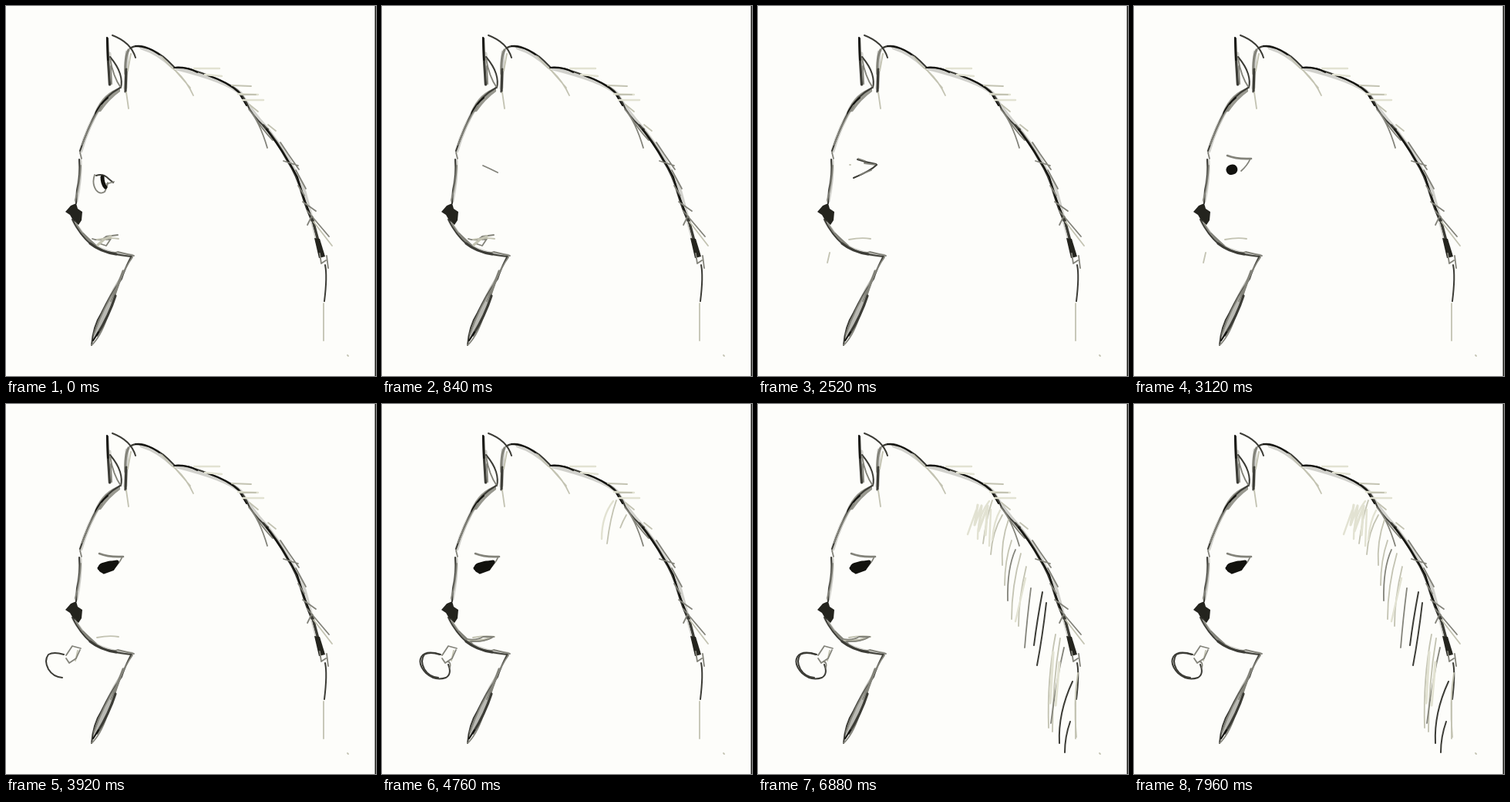
Animation of 480 by 480 pixels, one loop 8000 ms. Source, as an HTML page:

```html
<!DOCTYPE html>
<html lang="en">
<head>
<meta charset="utf-8">
<title>Pencil sketch</title>
<style>
  html, body { margin: 0; width: 100%; height: 100%; overflow: hidden; background: #fdfdfa; }
  svg { display: block; width: 100vw; height: 100vh; }
  #sketch { filter: blur(.55px); }
  path { fill: none; stroke-linecap: round; stroke-linejoin: round; }
  .ink { stroke: #12120e; stroke-width: 2; }
  .dark { stroke: #3c3c36; stroke-width: 2; }
  .mid { stroke: #83837a; stroke-width: 1.8; }
  .pale { stroke: #c3c3b2; stroke-width: 1.8; }
  .wash { stroke: #e2e2d2; stroke-width: 2.4; }
  .bold { stroke-width: 3.2; }
  .soft { stroke: #77776c; stroke-width: 5; opacity: .32; }
  .fill { fill: #24241e; stroke: none; }
  .shade { fill: #77776c; stroke: none; opacity: .75; }
  [data-t] { visibility: hidden; stroke-dasharray: 1 2; }
</style>
</head>
<body>
<svg viewBox="0 0 480 480">
  <path d="M479.250 0V480" stroke="#20201c" stroke-width="1.5"/>
  <g id="sketch">

  <g id="ears">
    <path class="soft" d="M134 62L135 101M157 60L155 106"/>
    <path class="dark bold" d="M131.500 42Q132 72 134.500 102"/>
    <path class="ink" d="M131 41L132 70"/>
    <path class="dark" d="M138 38Q162 47 168 67"/>
    <path class="dark" d="M135 66Q145 78 148 88T149 106"/>
    <path class="mid" d="M135 68Q139 92 149 106M136 78L137 101"/>
    <path class="mid bold" d="M159 57Q154 66 155 88"/>
    <path class="dark bold" d="M156 82L155 111"/>
    <path class="pale" d="M156 112L159 133M162 62L158 84"/>
    <path class="soft" d="M176 54Q198 61 216 79"/>
    <path class="dark" d="M161 55Q168 50 180 53Q199 60 210 71L219 80"/>
    <path class="ink" d="M168 52Q184 52 199 63"/>
    <path class="pale" d="M202 66Q211 77 220 84Q235 98 243 116M218 82L239 106"/>
  </g>

  <g id="back">
    <path class="soft" d="M222 81Q286 97 304 113Q316 134 340 161Q370 199 387 241L407 315"/>
    <path class="dark" d="M218 80Q230 78 245 84Q286 97 301 110Q310 119 316 134Q327 151 340 160"/>
    <path class="ink" d="M219 80Q236 79 248 86M262 90Q288 99 302 112L312 129"/>
    <path class="mid" d="M315 134Q329 150 339 184M320 140Q333 161 346 174"/>
    <path class="dark bold" d="M334 155Q352 176 365 200Q378 220 384 243Q390 263 397 278"/>
    <path class="ink" d="M338 160Q361 190 378 222Q384 246 397 276L410 324"/>
    <path class="dark bold" d="M397 274L406 308"/>
    <path class="fill" d="M400 301L407 302L414 325L406 327Z"/>
    <path class="mid" d="M407 321L409 334L415 330M416 324L418 340"/>
    <path class="dark" d="M414 336Q417 350 413 383"/>
    <path class="pale" d="M412 386V434"/>
    <path class="wash" d="M244 81H277M258 89L280 91M307 122H334M301 114L327 115"/>
    <path class="pale" d="M293 103L318 104M304 115L324 115M316 128L327 137M340 154L350 162"/>
    <path class="mid" d="M356 177L366 192L380 212M360 201L379 207M376 213L389 237M379 233L387 246M385 254L402 266M391 266L419 299M396 274L391 284"/>
    <path class="pale" d="M399 280L423 311"/>
  </g>

  <g id="profile">
    <path class="shade" d="M148 106Q126 112 115 138L123 137Q134 121 148 111Z"/>
    <path class="soft" d="M123 129Q106 156 97 188M96 201Q97 224 91 253"/>
    <path class="dark" d="M148 106Q128 117 118 136Q106 159 96 188"/>
    <path class="ink" d="M132 119Q121 128 116 140"/>
    <path class="mid" d="M124 129Q109 151 99 180M96 190L98 198"/>
    <path class="dark" d="M95 199Q97 219 92 239L91 256"/>
    <path class="mid" d="M97 207Q96 230 90 252"/>
    <path class="fill" d="M77 267L84 259L91 256L93 263L99 267L98 278L94 284L87 278L83 271Z"/>
    <path class="soft" d="M89 281Q106 309 124 316Q142 323 163 324"/>
    <path class="dark" d="M86 277Q96 297 110 309Q125 321 163 325"/>
    <path class="mid" d="M91 283Q103 303 119 313T145 319L166 324M100 295L117 311"/>
    <path class="dark bold" d="M109 308Q123 319 143 322"/>
  </g>

  <g id="neck">
    <path class="shade" d="M152 346Q139 363 125 395Q113 414 112 437L121 424Q134 404 140 381Z" style="opacity:.5"/>
    <path class="dark" d="M162 326Q154 341 150 354Q135 375 124 398Q113 415 111 440"/>
    <path class="mid" d="M164 326Q155 338 147 359Q139 383 131 405Q122 430 111 440M144 364Q126 391 114 426M155 340L136 383"/>
    <path class="dark bold" d="M142 376Q134 401 118 427"/>
    <path class="mid bold" d="M152 344L144 365"/>
    <path class="ink" d="M120 423L113 434"/>
  </g>
  <path class="pale" d="M443 453L444 454"/>

  <!-- data-t: draw start, draw end, erase start, erase end -->
  <g id="eyes">
    <path class="mid" data-t="-2 -1 0 240" d="M115 219Q111 230 117 239Q122 245 128 241Q132 233 132 229"/>
    <path class="dark" data-t="-2 -1 160 400" d="M117 220Q126 217 133 224L139 229"/>
    <path class="ink" data-t="-2 -1 280 560" stroke-linecap="butt" style="stroke-width:5" d="M125 222Q125 230 129 235"/>
    <path class="mid" data-t="-2 -1 360 600" d="M130 231L140 228"/>
    <path class="mid" data-t="680 840 1000 1240" d="M131 207Q140 211 150 216"/>
    <path class="dark" data-t="1320 1600 2600 2760" d="M129 199Q140 203 153 205"/>
    <path class="mid" data-t="1600 1760 2600 2760" d="M130 198L139 201M138 204L154 206"/>
    <path class="dark" data-t="1760 2120 2640 2840" d="M154 206Q146 214 124 223"/>
    <path class="mid" data-t="2120 2280 2640 2840" d="M147 213L132 219"/>
    <path class="pale" data-t="2280 2320 2700 2760" d="M119 206L120 206"/>
    <path class="mid" data-t="2840 3040" style="stroke-width:2.600" d="M121 194Q133 199 152 198"/>
    <path class="mid" data-t="3000 3120" d="M151 198Q147 207 139 214"/>
    <path class="ink" data-t="3080 3280" style="stroke-width:13" d="M126 212.500L135 210"/>
    <path class="ink" data-t="3240 3360" style="stroke-width:5" d="M121 213Q130 206 144 205L138 214L127 218"/>
  </g>

  <g id="mouth">
    <path class="mid" data-t="-2 -1 1300 1560" d="M112 302Q123 306 130 299L145 297"/>
    <path class="mid" data-t="-2 -1 1480 1720" d="M121 308L130 311L136 302L130 303"/>
    <path class="pale bold" data-t="-2 -1 1600 1880" d="M119 310L127 303L136 299"/>
    <path class="pale" data-t="-2 -1 7440 7800" d="M118 303Q134 300 146 302"/>
    <path class="pale bold" data-t="4320 4560 7480 7840" d="M112 306Q128 309 141 303"/>
    <path class="mid" data-t="4320 4520 7440 7760" d="M107 304Q121 308 131 302L145 302"/>
    <path class="mid" data-t="4480 4640 7560 7880" d="M115 308Q132 309 143 303"/>
  </g>

  <g id="mushroom">
    <path class="pale" data-t="2400 2520" d="M93 320L90 333"/>
    <path class="mid" data-t="3200 3320" d="M78 326L86 314L97 317"/>
    <path class="mid" data-t="3320 3480" d="M96 319L91 330L82 336L78 330"/>
    <path class="dark" data-t="3480 3880" d="M75 325Q62 321 55 325Q49 333 55 344Q61 354 73 355"/>
    <path class="dark" data-t="3960 4240" d="M76 325Q57 319 51 328Q46 337 57 349Q69 360 83 355Q91 350 86 338"/>
    <path class="mid" data-t="4200 4320" d="M88 342Q90 335 85 334"/>
  </g>

  <g id="mane">
    <path class="wash" data-t="4560 4680" d="M300 126Q285 145 285 175"/>
    <path class="pale" data-t="4640 4760" d="M304 125Q296 148 292 181"/>
    <path class="pale" data-t="4720 4840" d="M317 144Q304 166 302 195"/>
    <path class="wash" data-t="4800 4880" d="M314 138Q306 152 304 176"/>
    <path class="pale" data-t="4840 4960" d="M325 150Q315 178 317 209"/>
    <path class="pale" data-t="4920 5040" d="M329 177Q320 203 320 235"/>
    <path class="mid" data-t="5000 5120" d="M334 189Q323 213 324 255"/>
    <path class="pale" data-t="5080 5200" d="M341 194Q329 236 329 279"/>
    <path class="pale" data-t="5160 5280" d="M348 211Q338 252 338 288"/>
    <path class="mid" data-t="5240 5400" d="M354 239Q349 279 346 316"/>
    <path class="wash" data-t="5320 5440" d="M347 226L334 282"/>
    <path class="dark" data-t="5400 5560" d="M369 244Q362 281 358 313"/>
    <path class="dark" data-t="5640 5800" d="M374 258Q369 302 362 339"/>
    <path class="wash bold" data-t="5800 5960" d="M285 131L281 157L290 132L286 165L298 132L295 170"/>
    <path class="wash" data-t="5920 6040" d="M283 138L272 169M302 137L300 184"/>
    <path class="pale" data-t="6000 6160" d="M386 299Q375 356 377 420"/>
    <path class="pale" data-t="6120 6280" d="M392 304Q382 364 382 425"/>
    <path class="mid" data-t="6240 6360" d="M397 316Q387 358 380 414"/>
    <path class="wash bold" data-t="6320 6440" d="M383 322L379 388M391 335L386 391"/>
    <path class="dark" data-t="6400 6560" d="M408 360Q389 401 391 440"/>
    <path class="dark" data-t="6520 6680" d="M405 412Q398 432 398 452"/>
    <path class="pale" data-t="6640 6760" d="M415 349Q409 386 413 432"/>
  </g>

  </g>
</svg>
<script>
  const LOOP = 8000;
  const ramp = (t, from, to) => Math.min(1, Math.max(0, (t - from) / (to - from)));

  const strokes = [...document.querySelectorAll('[data-t]')].map(path => {
    path.setAttribute('pathLength', 1);
    const [on, full, off = Infinity, gone = Infinity] = path.dataset.t.split(' ').map(Number);
    return { path, on, full, off, gone };
  });

  function draw(now) {
    const t = now % LOOP;
    for (const { path, on, full, off, gone } of strokes) {
      const erased = t > off ? ramp(t, off, gone) : 0;
      const shown = ramp(t, on, full) - erased;
      path.style.visibility = shown > 0.001 ? 'visible' : 'hidden';
      path.style.strokeDashoffset = 1 - shown;
    }
    requestAnimationFrame(draw);
  }
  draw(0);
</script>
</body>
</html>
```
